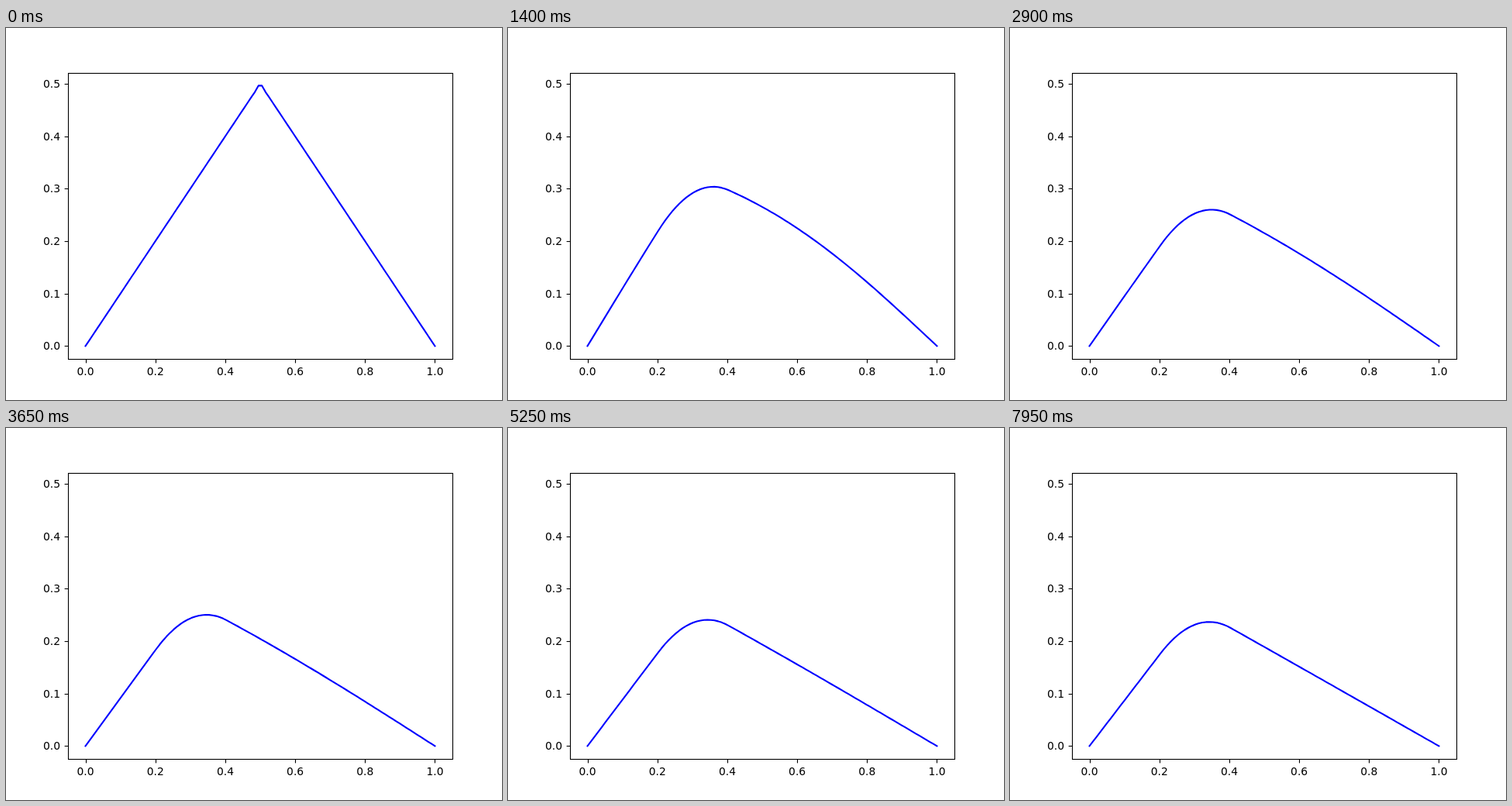
An HTML page with a canvas for the animation above (8 s loop, 640 px wide and 480 px high).

```html
<!DOCTYPE html>
<html>
<head>
<meta charset="utf-8">
<style>
html, body { margin: 0; width: 100%; height: 100%; overflow: hidden; background: #fff; }
canvas { display: block; }
</style>
</head>
<body>
<canvas id="stage" width="640" height="480"></canvas>
<script>
const ctx = document.getElementById('stage').getContext('2d');
const FRAME = 50, FRAMES = 160;

// Heated rod: linear finite elements in space, implicit Euler in time.
const CELLS = 99, h = 1 / CELLS;
const DIFFUSION = 0.00358;   // conductivity times time step
const HEAT = 6.153;          // source strength over conductivity
const HEAT_FROM = 20, HEAT_TO = 40;

// Solves a symmetric constant tridiagonal system with zero ends.
function solve(diag, off, rhs) {
  const c = [0], d = [0], u = new Array(CELLS + 1).fill(0);
  for (let i = 1; i < CELLS; i++) {
    const m = diag - off * c[i - 1];
    c[i] = off / m;
    d[i] = (rhs[i] - off * d[i - 1]) / m;
  }
  for (let i = CELLS - 1; i > 0; i--) u[i] = d[i] - c[i] * u[i + 1];
  return u;
}

const massTimes = u => u.map((v, i) =>
  i > 0 && i < CELLS ? h / 6 * (u[i - 1] + 4 * v + u[i + 1]) : 0);

function heatLoad(i) {
  if (i < HEAT_FROM || i > HEAT_TO) return 0;
  return DIFFUSION * HEAT * h * (i === HEAT_FROM || i === HEAT_TO ? 0.5 : 1);
}

// The start is the triangle projected onto the mesh; its tip lies inside the middle cell.
function startProfile() {
  const hat = Array.from({ length: CELLS + 1 }, (_, i) => Math.min(i, CELLS - i) * h);
  const rhs = massTimes(hat);
  const mid = (CELLS - 1) / 2;
  rhs[mid] += h * h / 8;
  rhs[mid + 1] += h * h / 8;
  return solve(h * 2 / 3, h / 6, rhs);
}

const profiles = [startProfile()];
while (profiles.length < FRAMES) {
  const rhs = massTimes(profiles[profiles.length - 1]).map((v, i) => v + heatLoad(i));
  profiles.push(solve(h * 2 / 3 + 2 * DIFFUSION / h, h / 6 - DIFFUSION / h, rhs));
}

const yScale = 336 / Math.max(...profiles[0]);
const px = x => 102.545 + 450.909 * x;
const py = y => 410.4 - yScale * y;

function line(x1, y1, x2, y2) {
  ctx.beginPath();
  ctx.moveTo(x1, y1);
  ctx.lineTo(x2, y2);
  ctx.stroke();
}

function drawAxes() {
  ctx.strokeStyle = ctx.fillStyle = '#000';
  ctx.lineWidth = 1.11;
  ctx.lineCap = 'butt';
  ctx.lineJoin = 'miter';
  ctx.font = '13.889px "DejaVu Sans", sans-serif';
  for (let i = 0; i <= 5; i++) {
    const x = Math.round(px(i / 5)), y = Math.round(py(i / 10));
    line(x + 0.5, 427.5, x + 0.5, 432.4);
    line(80.5, y + 0.5, 75.6, y + 0.5);
    ctx.fillText((i / 5).toFixed(1), px(i / 5) - 11, 448);
    ctx.fillText((i / 10).toFixed(1), 48, y + 5);
  }
  ctx.strokeRect(80.5, 58.5, 496, 369);
}

function drawCurve(u) {
  ctx.strokeStyle = '#00f';
  ctx.lineWidth = 2.083;
  ctx.lineCap = 'square';
  ctx.lineJoin = 'round';
  ctx.beginPath();
  u.forEach((v, i) => ctx.lineTo(px(i * h), py(v)));
  ctx.stroke();
}

function draw() {
  const frame = Math.floor(performance.now() / FRAME) % FRAMES;
  ctx.fillStyle = '#fff';
  ctx.fillRect(0, 0, 640, 480);
  drawCurve(profiles[frame]);
  drawAxes();
  requestAnimationFrame(draw);
}
draw();
</script>
</body>
</html>
```
